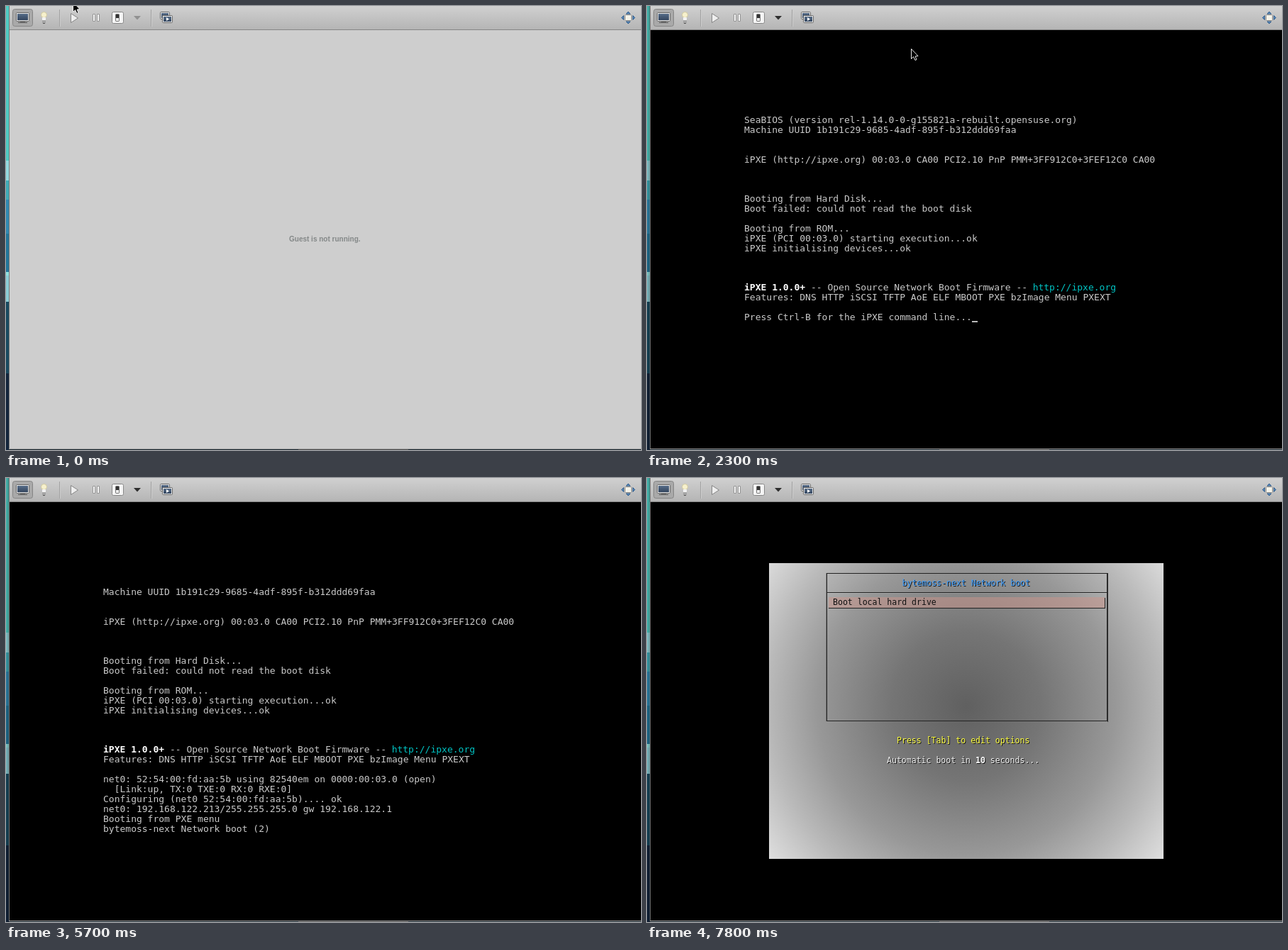
Write an HTML page with a canvas that moves like this. It is 895 px wide and 626 px high and loops after 8 s.

```html
<!DOCTYPE html>
<html>
<head>
<meta charset="utf-8">
<style>
html, body { margin: 0; width: 100%; height: 100%; overflow: hidden; background: #cecece }
canvas { display: block }
</style>
</head>
<body>
<canvas width="895" height="626"></canvas>
<script>
const c = document.querySelector('canvas').getContext('2d');
const MONO = '"DejaVu Sans Mono", monospace';
const LOOP = 8000, STEP = 100, ROW = 13.9, COL = 7.82;

const mix = (a, b, p) => a + (b - a) * p;
const clamp = v => Math.max(0, Math.min(1, v));
const grey = v => `rgb(${v},${v},${v})`;

function box(x, y, w, h, fill) {
  c.fillStyle = fill;
  c.fillRect(x, y, w, h);
}

function panel(x, y, w, h, r, fill, stroke) {
  c.beginPath();
  c.roundRect(x + .5, y + .5, w - 1, h - 1, r);
  c.fillStyle = fill;
  c.fill();
  c.strokeStyle = stroke;
  c.stroke();
}

function poly(points, fill, stroke) {
  c.beginPath();
  points.forEach(([x, y]) => c.lineTo(x, y));
  c.closePath();
  c.fillStyle = fill;
  c.fill();
  if (stroke) { c.strokeStyle = stroke; c.stroke(); }
}

function text(s, x, y, fill, font) {
  c.font = font;
  c.fillStyle = fill;
  c.fillText(s, x, y);
}

function vertical(y0, y1, ...stops) {
  const g = c.createLinearGradient(0, y0, 0, y1);
  stops.forEach((s, i) => g.addColorStop(i / (stops.length - 1), s));
  return g;
}

// Sliver of wallpaper beside the window: [top, colour]
const wallpaper = [[0, '#50cbc3'], [218, '#93d8df'], [246, '#3fabb8'], [273, '#3189b2'],
  [321, '#23769a'], [375, '#8fe0de'], [380, '#8bcdd6'], [417, '#194a60'], [518, '#13253c']];

function drawDesktop(focus) {
  wallpaper.forEach(([y, col], i) => {
    const end = i + 1 < wallpaper.length ? wallpaper[i + 1][0] : 626;
    box(0, y, 4, end - y, col);
  });
  const shade = c.createLinearGradient(0, 0, 4, 0);
  shade.addColorStop(0, `rgba(0,0,0,${.08 * focus})`);
  shade.addColorStop(1, `rgba(0,0,0,${.3 * focus})`);
  box(0, 0, 4, 626, shade);
  box(4, 0, 1, 626, '#777');
  box(4, 624, 891, 1, '#a0a0a0');
  box(4, 625, 891, 1, '#16232c');
  box(412, 625, 155, 1, '#4a4a4a');
}

function screenIcon(x, y, w, h) {
  panel(x, y, w, h, 1, '#e9e9e9', '#666');
  box(x + 2, y + 2, w - 4, h - 4, vertical(y, y + h, '#5d7491', '#2c3d55'));
}

function drawToolbar(focus) {
  box(5, 0, 890, 33, vertical(0, 33, '#d0d0d0', '#b5b5b5'));
  box(5, 33, 890, 1, '#868686');

  panel(9, 4, 29, 25, 3, '#a9a9a9', '#858585');
  screenIcon(14, 9, 19, 13);
  box(20, 22, 7, 1, '#777');
  box(17, 23, 13, 1, '#555');

  c.beginPath();
  c.arc(53.5, 12.5, 4, 0, 7);
  c.fillStyle = '#f6f0cc';
  c.fill();
  c.strokeStyle = '#cfc7a0';
  c.stroke();
  box(51, 16, 5, 4, '#f2f2f2');
  box(51, 20, 5, 4, '#a5a5a5');
  box(52, 24, 3, 1, '#555');

  for (const x of [75, 204]) {
    box(x, 5, 1, 24, '#a2a2a2');
    box(x + 1, 5, 1, 24, '#cdcdcd');
  }

  poly([[91.5, 10.5], [101.5, 17], [91.5, 23.5]], '#eee', '#868686');
  for (const x of [122, 128]) panel(x, 11, 4, 11, 0, '#f4f4f4', '#969696');

  panel(149, 8, 17, 17, 2, '#f5f5f5', '#888');
  panel(154, 11, 6, 11, 1, '#333', '#777');
  box(155, 17, 4, 4, '#eee');

  poly([[180, 14], [190, 14], [185, 19.5]], grey(mix(145, 46, focus)));

  screenIcon(217, 8, 14, 11);
  screenIcon(220, 13, 15, 11);
  poly([[226, 16], [230, 18.5], [226, 21]], '#fff');

  panel(872, 12, 10, 9, 1, '#f4f2e8', '#888');
  for (let i = 0; i < 4; i++) {
    c.save();
    c.translate(877, 16.5);
    c.rotate(i * Math.PI / 2);
    const d = i % 2 ? 9.5 : 8.5;
    poly([[-3, 3 - d], [0, -d], [3, 3 - d]], '#5b8abb', '#34608e');
    c.restore();
  }
}

const early = [
  [0, 'SeaBIOS (version rel-1.14.0-0-g155821a-rebuilt.opensuse.org)'],
  [1, 'Machine UUID 1b191c29-9685-4adf-895f-b312ddd69faa'],
  [4, 'iPXE (http://ipxe.org) 00:03.0 CA00 PCI2.10 PnP PMM+3FF912C0+3FEF12C0 CA00'],
  [8, 'Booting from Hard Disk...'],
  [9, 'Boot failed: could not read the boot disk'],
  [11, 'Booting from ROM...'],
  [12, 'iPXE (PCI 00:03.0) starting execution...ok'],
  [13, 'iPXE initialising devices...ok']];
const banner = [
  [17, ' '.repeat(12) + '-- Open Source Network Boot Firmware --'],
  [18, 'Features: DNS HTTP iSCSI TFTP AoE ELF MBOOT PXE bzImage Menu PXEXT']];
const prompt = [[20, 'Press Ctrl-B for the iPXE command line...']];
const dhcp = [
  [20, 'net0: 52:54:00:fd:aa:5b using 82540em on 0000:00:03.0 (open)'],
  [21, '  [Link:up, TX:0 TXE:0 RX:0 RXE:0]'],
  [22, 'Configuring (net0 52:54:00:fd:aa:5b)...']];
const pxe = [
  [22, ' '.repeat(39) + '. ok'],
  [23, 'net0: 192.168.122.213/255.255.255.0 gw 192.168.122.1'],
  [24, 'Booting from PXE menu']];
const HOST = 'bytemoss-next';

function drawConsole(t) {
  const lines = [...early];
  const scroll = t >= 5500 ? 1 : 0;
  if (t >= 1400) lines.push(...banner, ...(t < 4400 ? prompt : dhcp));
  if (scroll) lines.push(...pxe, [25, `${HOST} Network boot (${t < 6600 ? 2 : 1})`]);

  const put = (row, col, s, fill = '#cacaca', weight = '') =>
    text(s, 137 + col * COL, 165 + Math.round((row - scroll) * ROW), fill, `${weight} 13px ${MONO}`);
  lines.filter(([row]) => row >= scroll).forEach(([row, s]) => put(row, 0, s));
  if (t < 1400) return;

  put(17, 0, 'iPXE 1.0.0+', '#fff', 'bold');
  put(17, 52, 'http://ipxe.org', '#00c4c4');
  const blink = Math.floor((t - 3760) / 270);
  if (blink % 2 === 0) {
    const [row, s] = lines[lines.length - 1];
    box(Math.round(137 + s.length * COL), Math.round(444 + (row - scroll - 20) * ROW), 8, 2, '#b9b9b9');
  }
}

function drawMenu() {
  const g = c.createRadialGradient(450, 322, 0, 450, 322, 350);
  [[0, '#606060'], [.3, '#757575'], [.6, '#989898'], [.8, '#b9b9b9'], [1, '#dedede']]
    .forEach(s => g.addColorStop(...s));
  box(172, 120, 556, 417, g);

  c.strokeStyle = '#222';
  c.strokeRect(253.5, 134.5, 395, 208);
  box(649, 134, 1, 210, '#333');
  box(252, 134, 1, 209, 'rgba(0,0,0,.25)');
  box(254, 161, 394, 1, '#222');
  box(254, 162, 394, 1, 'rgba(255,255,255,.15)');

  box(256, 168, 389, 15, 'rgba(205,150,140,.5)');
  box(256, 183, 390, 1, '#222');
  box(645, 169, 1, 15, '#222');

  const put = (s, x, y, fill, shadow, weight = '') => {
    const font = `${weight} 11.54px ${MONO}`;
    if (shadow) text(s, x + 1, y + 1, '#111', font);
    text(s, x, y, fill, font);
  };
  put(HOST + ' Network boot', 359.5, 152, '#40a0ff', true);
  put('Boot local hard drive', 262, 179, '#111');
  put('Press [Tab] to edit options', 352, 374, '#ffff40', true);
  put('Automatic boot in    seconds...', 338, 402, '#f0f0f0', true);
  put('10', 338 + 18 * 6.95, 402, '#fff', true, 'bold');
}

// Pointer path: [time, x, y]
const path = [[0, 94, -6], [100, 94, 10], [200, 95, 24], [1700, 95, 24], [2000, 378, 130],
  [2100, 378, 130], [2300, 372, 60], [2600, 338, -7], [3000, 338, -7], [3100, 290, 4],
  [3500, 60, 8], [3600, 52, -20]];

function drawPointer(t) {
  const i = path.findIndex(p => p[0] > t);
  if (i < 0) return;
  const a = path[i - 1], b = path[i], p = (t - a[0]) / (b[0] - a[0]);
  c.save();
  c.translate(Math.round(mix(a[1], b[1], p)) + .5, Math.round(mix(a[2], b[2], p)) + .5);
  poly([[0, 0], [0, 14], [3, 11], [5.5, 16], [7.5, 15], [5.5, 10.5], [9.5, 10]], '#000', '#e8e8e8');
  c.restore();
}

function draw(t) {
  const focus = clamp((t - 400) / 500);
  c.lineWidth = 1;
  box(0, 0, 895, 626, '#cecece');
  drawDesktop(focus);
  drawToolbar(focus);
  if (t < 1200) {
    const ink = [[132, 46], [136, 52], [136, 54]].map(([a, b]) => mix(a, b, focus));
    text('Guest is not running.', 399, 332, `rgb(${ink})`, 'bold 10px "Liberation Sans", sans-serif');
  } else {
    box(5, 34, 890, 590, '#000');
    if (t >= 7800) drawMenu();
    else if (t >= 1300 && t < 7700) drawConsole(t);
  }
  drawPointer(t);
}

const start = performance.now();
function tick() {
  const t = (performance.now() - start) % LOOP;
  draw(Math.floor(t / STEP) * STEP);
  requestAnimationFrame(tick);
}
tick();
</script>
</body>
</html>
```
